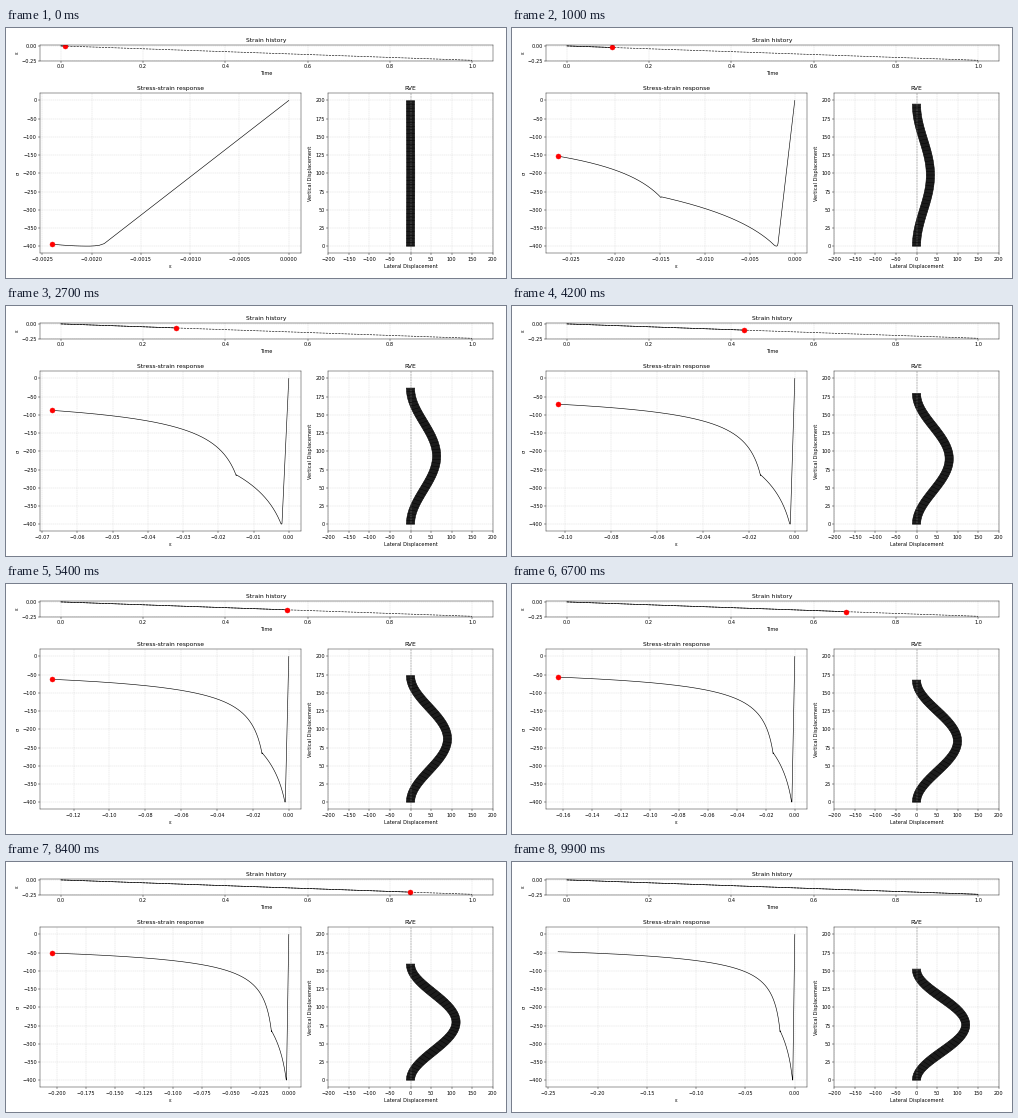
Write a matplotlib script that moves like this. It is 500 by 250 pixels and loops after 10 s.

```python
import numpy as np
import matplotlib.pyplot as plt
from matplotlib.animation import FuncAnimation
from matplotlib.collections import LineCollection

W, H, DPI = 500, 250, 500 / 14
FRAMES, SUB = 100, 50
EPS_MAX, HEIGHT, HALF = 0.24, 200, 10
YIELD, E_YIELD = 400, 0.00203

plt.rcParams["font.family"] = "DejaVu Sans"


def stress(e):
    """Compressive stress: elastic, yield, then two softening branches."""
    elastic = np.minimum(210000 * e, YIELD - 2e8 * (e - E_YIELD) ** 2)
    elastic = np.where(e < 0.0018, 210000 * e, elastic)
    crest = YIELD - 4e7 * (e - E_YIELD) ** 2
    bend = 394.5 - 91.7 * np.log1p(np.maximum(e - 0.0024, 0) / 0.004)
    tail = 24.8 * np.maximum(e - 0.0104, 1e-3) ** -0.44
    return np.select([e < E_YIELD, e < 0.0024, e < 0.0149],
                     [elastic, crest, bend], tail)


def sway(e):
    """Mid-height deflection from the balance of axial force and moment."""
    s = stress(e)
    return 5700 / s * (1 - (s / YIELD) ** 2.5)


def column(e, rows=81):
    """Left and right edges of the buckled strip, as (rows, 2) arrays."""
    h, a = HEIGHT * (1 - e), sway(e)
    y = np.linspace(0, h, rows)
    phase = 2 * np.pi * y / h
    mid = np.column_stack([a / 2 * (1 - np.cos(phase)), y])
    tilt = np.arctan(0.17 * a * np.pi / h * np.sin(phase))
    arm = HALF * np.column_stack([np.cos(tilt), -np.sin(tilt)])
    return mid - arm, mid + arm


def panel(x0, y0, x1, y1, title, xlabel, ylabel):
    ax = fig.add_axes([x0 / W, 1 - y1 / H, (x1 - x0) / W, (y1 - y0) / H])
    ax.set_title(title)
    ax.set_xlabel(xlabel)
    ax.set_ylabel(ylabel)
    ax.grid(True, ls="--", alpha=0.5)
    ax.set_axisbelow(True)
    return ax


fig = plt.figure(figsize=(W / DPI, H / DPI), dpi=DPI)
hist = panel(34.3, 17.2, 486.6, 33, "Strain history", "Time", "ε")
curve = panel(34.3, 65.2, 294.6, 225.4, "Stress-strain response", "ε", "σ")
rve = panel(322.4, 65.2, 486.6, 225.4, "RVE",
            "Lateral Displacement", "Vertical Displacement")

hist.set(xlim=(-0.05, 1.05), ylim=(-1.05 * EPS_MAX, 0.05 * EPS_MAX))
curve.set_ylim(-420, 20)
rve.set(xlim=(-200, 200), ylim=(-10, 210))
rve.set_xticks(range(-200, 201, 50))
rve.set_yticks(range(0, 201, 25))

hist.plot([0, 1], [0, -EPS_MAX], "k--", lw=1.2)
past, = hist.plot([], [], "k-", lw=1.2)
path, = curve.plot([], [], "k-", lw=1.2)
dots = [ax.plot([], [], "ro", ms=10)[0] for ax in (hist, curve)]

rve.axvline(0, color="gray", ls="--", lw=1)
body, = rve.fill([0, 0, 0], [0, 1, 2], fc="#1c1c1c", ec="black", lw=1)
ribs = LineCollection([], colors="black", linewidths=0.8)
rve.add_collection(ribs, autolim=False)

eps = np.linspace(0, EPS_MAX, FRAMES * SUB + 1)
sig = -stress(eps)


def draw(i):
    t = (i + 1) / FRAMES
    e = EPS_MAX * t
    end = (i + 1) * SUB
    past.set_data([0, t], [0, -e])
    path.set_data(-eps[:end + 1], sig[:end + 1])
    curve.set_xlim(-1.05 * e, 0.05 * e)
    dots[0].set_data([t], [-e])
    dots[1].set_data([-e], [sig[end]])
    for d in dots:
        d.set_visible(i < FRAMES - 1)
    left, right = column(e)
    body.set_xy(np.vstack([left, right[::-1]]))
    ribs.set_segments(np.stack([left, right], axis=1)[::2])
    return [past, path, *dots, body, ribs]


anim = FuncAnimation(fig, draw, frames=FRAMES, interval=100,
                     repeat=True, repeat_delay=0, blit=False)
plt.show()
```
